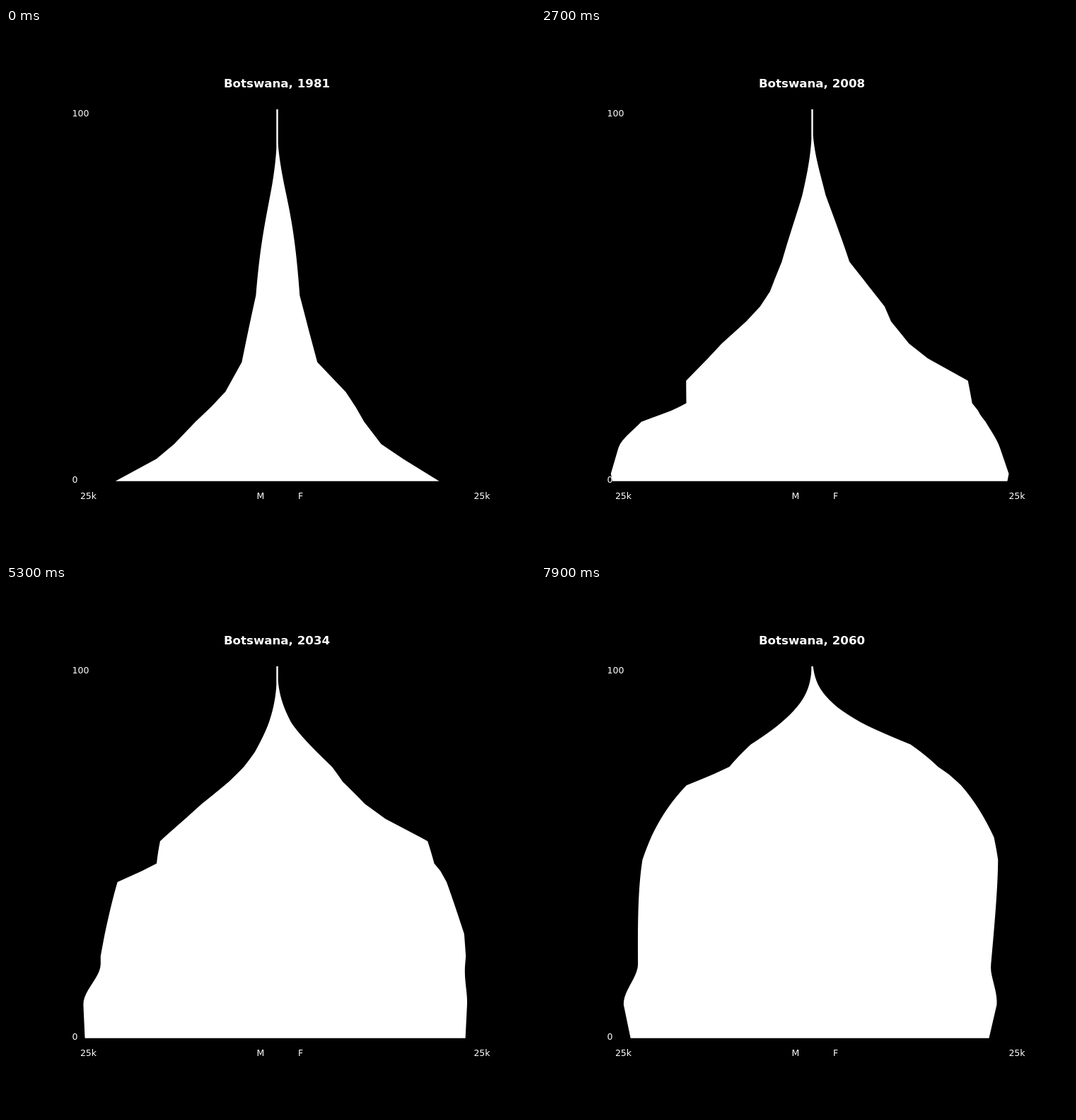
An HTML page for the animation above (8 s loop, 748 px wide and 748 px high).

```html
<!DOCTYPE html>
<html lang="en">
<head>
<meta charset="utf-8">
<title>Population pyramid</title>
<style>
  html, body { margin: 0; width: 100%; height: 100%; overflow: hidden; background: #000; }
  svg { display: block; width: 100%; height: 100%; }
  text { font: 12.5px "DejaVu Sans", sans-serif; fill: #fff; }
  .mid { text-anchor: middle; }
  #title { font-size: 16.67px; font-weight: bold; }
</style>
</head>
<body>
<svg viewBox="0 0 748 748">
  <polygon id="shape" fill="#fff"/>
  <text id="title" class="mid" x="383" y="83.5"></text>
  <text x="93.6" y="125">100</text>
  <text x="93.6" y="643">0</text>
  <text class="mid" x="116.5" y="666">25k</text>
  <text class="mid" x="360" y="666">M</text>
  <text class="mid" x="416.5" y="666">F</text>
  <text class="mid" x="673" y="666">25k</text>
</svg>
<script>
const FIRST = 1981, YEARS = 80, YEAR_MS = 100;
const CENTER = 383.5, TOP = 115, BOTTOM = 640.8, MIN_WIDTH = 1.2;

// Birth year, then width in px: boys, men, girls, women.
const cohorts = [
  [1901, 27, 27, 25, 25],
  [1931, 33, 33, 33, 33],
  [1941, 43, 43, 46, 46],
  [1949, 51, 51, 57, 57],
  [1957, 74, 65, 97, 88],
  [1961, 94, 78, 111, 104],
  [1965, 116, 97, 123, 112],
  [1971, 146, 131, 147, 137],
  [1975, 171, 150, 178, 163],
  [1981, 229, 180, 229, 220],
  [1987, 230, 179, 231, 226],
  [1989, 246, 199, 242, 234],
  [1992, 264, 233, 253, 242],
  [2006, 285, 246, 278, 265],
  [2012, 278, 251, 272, 267],
  [2042, 270, 247, 264, 252],
  [2051, 267, 245, 261, 250],
  [2060, 257, 240, 250, 245]
];

// `leaving`: earliest year of losses; `lifespan` and `spread` shape old age.
const men = { sign: -1, child: 1, adult: 2, leaving: 1994, lifespan: 82, spread: 12 };
const women = { sign: 1, child: 3, adult: 4, leaving: 1999, lifespan: 86, spread: 10 };

const lerp = (a, b, u) => a + (b - a) * u;
const clamp = v => Math.min(1, Math.max(0, v));
const smooth = u => u * u * (3 - 2 * u);

function cohortSize(birth, column) {
  const n = Math.max(1, cohorts.findIndex(c => c[0] >= birth));
  const a = cohorts[n - 1], b = cohorts[n];
  return lerp(a[column], b[column], clamp((birth - a[0]) / (b[0] - a[0])));
}

// Each birth year keeps its size, shrinks once in its teens, then dies out with age.
function width(sex, age, year) {
  const birth = year - age;
  const grown = smooth(clamp((year - Math.max(birth + 9, sex.leaving)) / 11));
  const size = lerp(cohortSize(birth, sex.child), cohortSize(birth, sex.adult), grown);
  const lifespan = sex.lifespan + 0.08 * (birth - 1971);
  const alive = Math.exp(-Math.exp((age - lifespan) / sex.spread));
  return Math.max(MIN_WIDTH, size * alive);
}

function outline(sex, year) {
  return Array.from({ length: 101 }, (_, age) => {
    const x = CENTER + sex.sign * width(sex, age, year);
    return [x.toFixed(2), lerp(BOTTOM, TOP, age / 100).toFixed(2)];
  });
}

const shape = document.getElementById("shape");
const title = document.getElementById("title");
let shown;

function draw() {
  const year = FIRST + Math.floor(performance.now() / YEAR_MS) % YEARS;
  if (year !== shown) {
    shown = year;
    title.textContent = "Botswana, " + year;
    shape.setAttribute("points", [...outline(men, year), ...outline(women, year).reverse()].join(" "));
  }
  requestAnimationFrame(draw);
}
draw();
</script>
</body>
</html>
```
